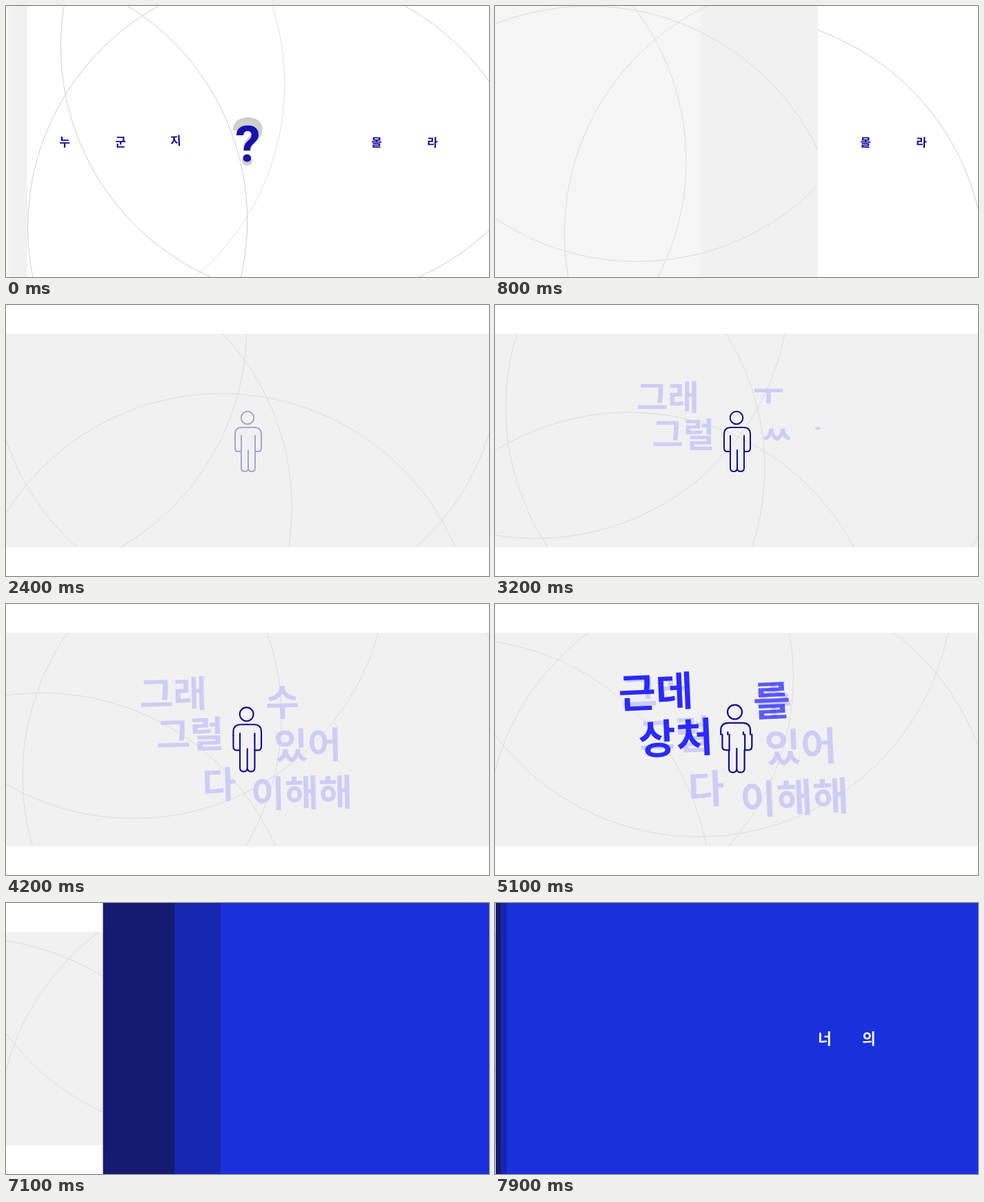
An HTML page for the animation above (8000 ms loop, 700 by 394 pixels).

```html
<!DOCTYPE html>
<html lang="ko">
<head>
<meta charset="utf-8">
<style>
  html, body { margin: 0; width: 100%; height: 100%; overflow: hidden; background: #fff; }
  #stage { display: block; width: 100vw; height: 100vh; }
  text { font-family: "Noto Sans CJK KR", "Noto Sans KR", "Noto Sans CJK", sans-serif; font-weight: 700; }
  .mid { text-anchor: middle; }
  .mark { font-family: Roboto, sans-serif; }
  .light { font-weight: 300; }
  .latin { font-family: Inter, sans-serif; font-weight: 300; }
  .ring { fill: none; stroke: #cfcfcf; stroke-width: 1; }
  .panel .ring { stroke: #dbdbdb; }
  .person { fill: none; stroke: #14108c; stroke-width: 2; stroke-linecap: round; }
</style>
</head>
<body>
<svg id="stage" viewBox="0 0 700 394"></svg>
<script>
const LOOP = 8000, STEP = 100, W = 700, H = 394;
const stage = document.getElementById('stage');

function add(parent, tag, attrs = {}, text) {
  const el = document.createElementNS('http://www.w3.org/2000/svg', tag);
  set(el, attrs);
  if (text) el.textContent = text;
  parent.appendChild(el);
  return el;
}
function set(el, attrs) {
  for (const k in attrs) el.setAttribute(k, attrs[k]);
}
const rect = (parent, fill) => add(parent, 'rect', { y: 0, height: H, width: 0, fill });
const clamp = v => Math.max(0, Math.min(1, v));
const ramp = (t, from, to, a = 0, b = 1) => a + (b - a) * clamp((t - from) / (to - from));

// Width a wipe still has to cross: soft start, then cubic ease-out
const rest = t => W * Math.pow(1 - clamp((t + 100) / 1689) * clamp(t / 200), 3);

function makeRings(parent, polar) {
  return polar.map(([d, a]) => ({ d, a, el: add(parent, 'circle', { class: 'ring', r: 368 }) }));
}
function spin(rings, cx, cy, turn) {
  for (const { d, a, el } of rings) {
    const rad = (a + turn) * Math.PI / 180;
    set(el, { cx: cx + d * Math.cos(rad), cy: cy + d * Math.sin(rad) });
  }
}

// ---- opening: question
const ask = add(stage, 'g');
const askRings = makeRings(ask, [[272, -31.6], [220, 33.3], [259, 154.6], [200, 206]]);
set(askRings[3].el, { opacity: .6 });
add(ask, 'text', { class: 'mid mark', x: 351, y: 231, 'font-size': 97, fill: '#cfcfcf' }, '?');
add(ask, 'text', { class: 'mid mark', x: 350.5, y: 226, 'font-size': 73, fill: '#1812aa' }, '?');
[['누', 85, 0], ['군', 166, 0], ['지', 246, -3], ['몰', 537, 2], ['라', 618, 2]]
  .forEach(([c, x, tilt]) => add(ask, 'text', {
    class: 'mid', y: 6.5, 'font-size': 17, fill: '#14109a',
    transform: `translate(${x} ${197 + tilt / 2}) rotate(${tilt})`
  }, c));
const strips = [['#f1f1f1', -992], ['#f6f6f6', -1263]]
  .map(([c, start]) => ({ start, el: rect(stage, c) }));

// ---- grey panel
const panel = add(stage, 'svg', { class: 'panel', width: 0, height: H });
const layers = [['#f1f1f1', 380], ['#f6f6f6', 606], ['#f1f1f1', 1000]]
  .map(([c, start]) => ({ start, el: rect(panel, c) }));
const rings = makeRings(panel, [[230, -64.5], [305, 38], [143, 127], [271, 200.5]]);

const me = add(panel, 'g', { fill: '#1a1686' });
const meWord = add(me, 'text', { x: 496, y: 189, 'font-size': 34, 'letter-spacing': -3 }, '내가');
const meNext = add(me, 'text', { class: 'mid light', x: 549.5, y: 232, 'font-size': 34 }, '참');
const meDot = add(me, 'circle', { cx: 499.5, cy: 159, r: 2, fill: 'none', stroke: '#111' });

// ---- pale words: text, centre, start, opacity after fading
const pale = [
  ['그래', 235, 127, 2400, .6],
  ['그럴', 261, 190, 2650, .6],
  ['수', 404, 140, 3070, .6],
  ['있어', 443, 207, 3090, 0],
  ['다', 306, 268, 3400, .4],
  ['이해해', 434, 281, 3550, .55]
].map(([str, x, y, start, end]) => {
  const el = add(panel, 'g', { fill: '#cdcdf6' });
  const size = 57, pitch = size * .92;
  const chars = [...str].map((c, i) => {
    const box = add(el, 'svg', {
      x: (i - str.length / 2) * pitch, y: -size / 2, width: pitch, height: size
    });
    return { at: start + i * 90, size, el: add(box, 'text', { class: 'mid', x: pitch / 2, 'font-size': size }, c) };
  });
  return { x, y, end, chars, el };
});

// ---- bright words laid over them, same columns
const bright = [
  ['근데', 233, 127, 4500, .8],
  ['상처', 262, 194, 4700, .82],
  ['를', 401, 140, 4950, .35],
  ['줬어', 442, 208, 5200, .55],
  ['나', 306, 266, 5450, .68],
  ['에게', 405, 279, 5700, .65]
].map(([str, x, y, start, end]) => ({
  start, end,
  el: add(panel, 'text', {
    class: 'mid', y: 22.4, 'font-size': 59, fill: '#2a2aff',
    transform: `translate(${x} ${y}) rotate(-2.5)`
  }, str)
}));

const person = add(panel, 'g', { class: 'person' });
add(person, 'circle', { r: 9.3 });
add(person, 'path', { d: 'M-18 29V24Q-18 14 -8 14H10Q20 14 20 24V29M-9 26V29M11 26V29' });
const arms = add(person, 'path', {
  d: 'M-18 29V44Q-18 49 -13.5 49H-9V29M20 29V44Q20 49 15.5 49H11V29'
});
const legs = add(person, 'path', {
  d: 'M-9 49V73Q-9 78 -4 78Q1 78 1 73V47M1 73Q1 78 6 78Q11 78 11 73V49'
});

// ---- bars, caption, blue ending
const bars = [0, 1].map(() => add(stage, 'rect', { width: W, fill: '#fff' }));
const caption = add(stage, 'text', {
  class: 'latin', x: 271, y: 353, 'font-size': 13, 'letter-spacing': 2.8, fill: '#8880cc'
}, "I'M EMBARRASSED");
const blues = [['#151b70', 6500], ['#1726b0', 6700], ['#1930dc', 6800]]
  .map(([c, start]) => ({ start, el: rect(stage, c) }));
const yours = [['너', 478, 7500], ['의', 542, 7700]].map(([c, x, start]) => ({
  start, el: add(stage, 'text', { class: 'mid', x, y: 205, 'font-size': 21.5, fill: '#fff' }, c)
}));

function drawWords(t) {
  const zoom = ramp(t, 2300, 5100, .8, 1);
  const tilt = ramp(t, 3200, 5100, 0, -2.5);
  const fade = end => ramp(t, 5200, 6600, 1, end);
  for (const w of pale) {
    const x = 350 + (w.x - 350) * zoom, y = 172 + (w.y - 172) * zoom;
    set(w.el, {
      transform: `translate(${x} ${y}) rotate(${tilt}) scale(${zoom})`,
      opacity: fade(w.end)
    });
    for (const c of w.chars) {
      const lift = Math.pow(1 - ramp(t, c.at, c.at + 450), 2);
      set(c.el, { y: c.size * (.88 - lift) });
    }
  }
  for (const w of bright) set(w.el, { opacity: ramp(t, w.start, w.start + 200) * fade(w.end) });
}

function drawPerson(t) {
  const slip = ramp(t, 4500, 6600, 0, 7);
  const x = ramp(t, 3200, 5100, 350, 347.5), y = ramp(t, 3200, 5100, 164, 157);
  set(person, {
    transform: `translate(${x} ${y}) scale(${ramp(t, 3200, 5100, 1, 1.128)})`,
    opacity: ramp(t, 2300, 2600)
  });
  set(arms, { transform: `translate(${slip})` });
  set(legs, { transform: `translate(${slip * .75})` });
}

function draw(t) {
  spin(askRings, 215.7, 201, t * .027);
  for (const s of strips) set(s.el, { width: rest(t - s.start) });

  for (const l of layers) set(l.el, { width: W - rest(t - l.start) });
  set(panel, { width: W - rest(t - layers[0].start) });
  spin(rings, ramp(t, 1500, 3200, 180, 165), ramp(t, 1500, 5100, 232, 208),
    (Math.min(t, 5100) - 1500) * .0273);

  set(me, { opacity: ramp(t, 2100, 2400, 1, 0) });
  set(meWord, { opacity: ramp(t, 1100, 1300) });
  set(meNext, { opacity: ramp(t, 1300, 1500) });
  set(meDot, { opacity: t >= 1400 && t < 1900 ? 1 : 0 });
  drawWords(t);
  drawPerson(t);

  const bar = 41.7 * (1 - Math.pow(1 - ramp(t, 1120, 2220), 3));
  set(bars[0], { height: bar });
  set(bars[1], { y: H - bar, height: bar });
  set(caption, { opacity: ramp(t, 5600, 6200) });

  for (const b of blues) {
    const x = rest(t - b.start);
    set(b.el, { x, width: W - x });
  }
  for (const c of yours) set(c.el, { opacity: ramp(t, c.start, c.start + 200) });
}

const began = performance.now();
function tick() {
  const t = (performance.now() - began) % LOOP;
  draw(Math.floor(t / STEP) * STEP);
  requestAnimationFrame(tick);
}
tick();
</script>
</body>
</html>
```
